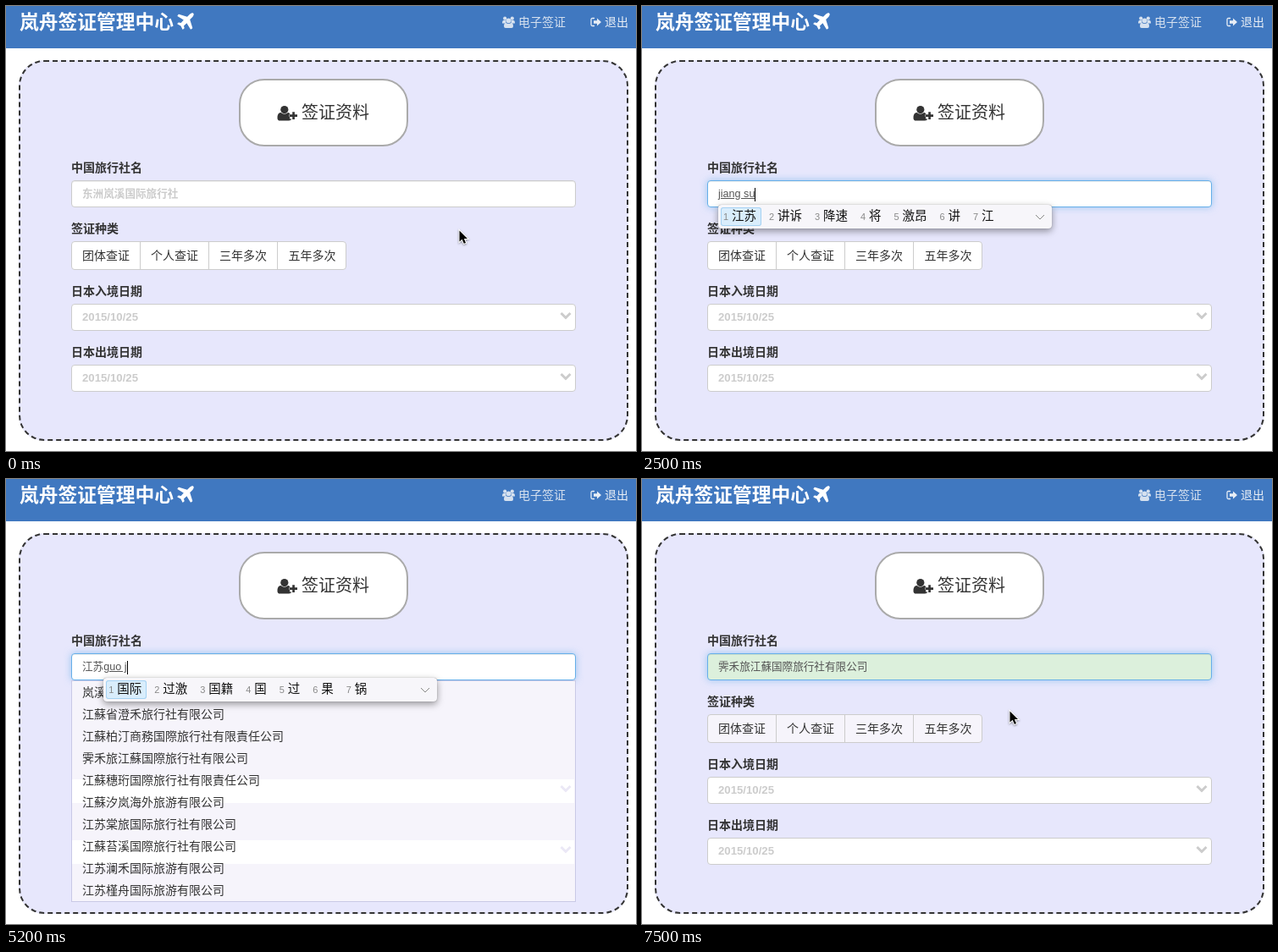
An HTML page that plays this animation: 744x526 px, repeating every 7600 ms.

```html
<!DOCTYPE html>
<html lang="zh-CN">
<head>
<meta charset="utf-8">
<title>签证资料</title>
<style>
html, body { margin: 0; width: 100%; height: 100%; overflow: hidden; background: #fff; }
#stage { position: relative; width: 744px; height: 526px; overflow: hidden; color: #333;
  font: 14px/20px "Liberation Sans", "Noto Sans CJK SC", "Noto Sans CJK", sans-serif; white-space: nowrap; }
#stage * { box-sizing: border-box; }
.abs, svg { position: absolute; }
header { position: absolute; left: 0; top: 0; width: 744px; height: 50px; background: #4078c0; }
.panel { left: 15px; top: 64px; width: 720px; height: 450px; border: 2px dashed #333;
  border-radius: 30px; background: #e7e7fc; }
.big { left: 275px; top: 86px; width: 200px; height: 80px; border: 2px solid #aaa;
  border-radius: 30px; background: #fff; }
.label { left: 77px; font-weight: bold; }
.field { left: 77px; width: 596px; height: 32px; padding-left: 12px; border: 1px solid #ccc;
  border-radius: 4px; background: #fff; font-size: 12.6px; line-height: 30px; color: #555; white-space: pre; }
.hint { color: #ccc; font-weight: bold; }
.date { font-size: 13.2px; }
.kinds { left: 77px; top: 278px; width: 325px; height: 34px; display: flex;
  border: 1px solid #ccc; border-radius: 4px; overflow: hidden; line-height: 32px; }
.kinds span { flex: none; width: 81px; text-align: center; border-right: 1px solid #ccc; }
.kinds span:last-child { border: 0; }
.caret { display: inline-block; width: 1px; height: 16px; margin-right: -1px;
  vertical-align: middle; background: #000; }
.list { left: 77px; top: 238px; width: 596px; border: 1px solid #c9c9e6; background: #f6f4fb; }
.row { position: relative; height: 26px; padding-left: 12px; line-height: 26px; }
.row.on { background: #a3d8ff; }
.band { left: 0; width: 593px; height: 28px; background: #fff; }
.ime { top: 235px; width: 394px; height: 28px; padding: 3px; border-radius: 4px; background: #f7f6fa;
  box-shadow: 0 0 1px #777, 0 3px 8px rgba(0,0,0,.4); font-size: 14.5px; line-height: 21px; color: #111; }
.ime span { display: inline-block; height: 22px; margin-right: 6px; padding: 0 6px 0 3px; border-radius: 3px; }
.ime span:first-child { background: #d9edfc; box-shadow: inset 0 0 0 1px #a5d2f3; }
.ime i { display: inline-block; width: 10px; font: 11px/21px "Liberation Sans", sans-serif; color: #888; }
#arrow, #beam { left: 0; top: 0; overflow: visible; }
</style>
</head>
<body>
<div id="stage">
  <header>
    <b class="abs" style="left:16px;top:4px;font-size:22.75px;line-height:30px;color:#fff">岚舟签证管理中心</b>
    <svg style="left:202px;top:8px" width="20" height="20" fill="#fff"><path d="M19.3.7C20.2 1.6 19.6 3.6 18.2 5L15.2 8L18.2 17.8Q18.3 18.2 18 18.5L16.6 19.5Q16 19.8 15.7 19.2L11.4 12.2L8 15.4L8.6 17.8Q8.7 18.2 8.4 18.4L7.2 19.6Q6.8 19.9 6.4 19.4L4.4 15.6L.6 13.6Q.1 13.2.4 12.8L1.6 11.6Q1.8 11.3 2.2 11.4L4.6 12L7.8 8.6L.8 4.3Q.2 4 .5 3.4L1.5 2Q1.8 1.7 2.2 1.8L12 4.8L15 1.8C16.4.4 18.4-.2 19.3.7Z"/></svg>
    <svg style="left:586px;top:12px" width="16" height="15" fill="#d6e1ef">
      <circle cx="3.2" cy="2.7" r="2.1"/><circle cx="11.8" cy="2.7" r="2.1"/>
      <path d="M0 8.5Q0 4.6 1.8 5h3Q3.6 6.8 4.7 8.5zM15 8.5Q15 4.6 13.2 5h-3Q11.4 6.8 10.3 8.5z"/>
      <circle cx="7.5" cy="5.3" r="2.9"/>
      <path d="M2 12Q2 7.8 4.5 8Q7.5 10 10.5 8Q13 7.8 13 12Q13 14 11 14H4Q2 14 2 12z"/>
    </svg>
    <span class="abs" style="left:605px;top:9px;color:#d6e1ef">电子签证</span>
    <svg style="left:690px;top:13px" width="14" height="13" fill="#e8eef6">
      <path d="M5 1.5H2.5Q1 1.5 1 3v6q0 1.5 1.5 1.5H5" fill="none" stroke="#e8eef6" stroke-width="1.3"/>
      <path d="M4 4.3h4V1.5L13 6 8 10.5V7.7H4z"/>
    </svg>
    <span class="abs" style="left:707px;top:9px;color:#e8eef6">退出</span>
  </header>
  <div class="abs panel"></div>
  <div class="abs big"></div>
  <svg style="left:320px;top:117px" width="25" height="20" fill="#333">
    <circle cx="8.8" cy="5.6" r="4.6"/>
    <path d="M.5 15.5Q.5 8.6 4.6 9Q8.8 12.6 13 9Q14.4 9 15.2 10.3V16.5H17.4Q16.6 18.6 14 18.6H3.7Q.5 18.6.5 15.5z"/>
    <path d="M18.2 8.2h2.7v3H24v2.7h-3.1V17h-2.7v-3.1H15v-2.7h3.2z" stroke="#fff" stroke-width="1" paint-order="stroke"/>
  </svg>
  <span class="abs" style="left:349px;top:111px;font-size:20px;line-height:30px">签证资料</span>
  <span class="abs label" style="top:181px">中国旅行社名</span>
  <div class="abs field" id="agency" style="top:206px"></div>
  <span class="abs label" style="top:253px">签证种类</span>
  <div class="abs kinds" id="kinds"><span>团体查证</span><span>个人查证</span><span>三年多次</span><span>五年多次</span></div>
  <span class="abs label" style="top:327px">日本入境日期</span>
  <div class="abs field hint date" style="top:352px">2015/10/25</div>
  <span class="abs label" style="top:399px">日本出境日期</span>
  <div class="abs field hint date" style="top:424px">2015/10/25</div>
  <svg width="744" height="526" style="left:0;top:0" fill="none" stroke="#ccc" stroke-width="3"><path d="M655.5 363l5.5 5.5 5.5-5.5m-11 72l5.5 5.5 5.5-5.5"/></svg>
  <div id="popups"></div>
  <svg id="arrow" width="12" height="18"><path d="M.5.5V13.6L3.6 10.8 5.8 15.8 8 14.9 5.9 10H10z" stroke="#fff" stroke-width="2" paint-order="stroke" style="filter:drop-shadow(0 1px 1px #0006)"/></svg>
  <svg id="beam" width="8" height="18" fill="none" stroke="#000"><path d="M-3-7.5Q0-7.5.5-6Q1-7.5 4-7.5M.5-6V7M-1.5 2.5h4M-3 8.5Q0 8.5.5 7Q1 8.5 4 8.5"/></svg>
</div>
<script>
const LOOP = 7600, FOCUS = 1100, PICK = 6600;
const agencies = [
  '岚溪云旅（江蘇）国際旅行社有限公司', '江蘇省澄禾旅行社有限公司',
  '江蘇柏汀商務国際旅行社有限責任公司', '霁禾旅江蘇国際旅行社有限公司',
  '江蘇穗珩国際旅行社有限責任公司', '江蘇汐岚海外旅游有限公司',
  '江苏棠旅国际旅行社有限公司', '江蘇苔溪国際旅行社有限公司',
  '江苏澜禾国际旅游有限公司', '江苏槿舟国际旅游有限公司'];
const chosen = agencies[3];
// Each word is typed as pinyin, then committed from the candidate bar.
const words = [
  { keys: 'jiang su', start: 1500, step: 120, commit: 2700, text: '江苏',
    partial: '将 讲 江 降 奖 姜 酱', full: '江苏 讲诉 降速 将 激昂 讲 江' },
  { keys: 'guo ji', start: 4500, step: 150, commit: 5600, text: '国际',
    partial: '国 过 果 锅 郭 裹 帼', full: '国际 过激 国籍 国 过 果 锅' }];
const mouse = [[0, 535, 265], [300, 535, 265], [1000, 386, 222], [2800, 386, 222], [3300, 371, 322],
  [3600, 372, 400], [4200, 366, 198], [5900, 366, 198], [6300, 372, 250], [6700, 372, 250],
  [7300, 434, 274], [LOOP, 434, 274]];
const $ = id => document.getElementById(id);
const between = (t, a, b) => t >= a && t < b;

function mouseAt(t) {
  const i = mouse.findIndex(k => k[0] > t), [a, x, y] = mouse[i - 1], [b, x2, y2] = mouse[i];
  const u = (t - a) / (b - a), e = u * u * (3 - 2 * u);
  return [x + (x2 - x) * e, y + (y2 - y) * e];
}

function imeBar(word, typed, left) {
  const items = (typed.length > word.keys.length - 2 ? word.full : word.partial).split(' ');
  return `<div class="abs ime" style="left:${left}px">` +
    items.map((s, i) => `<span><i>${i + 1}</i>${s}</span>`).join('') +
    '<svg width="12" height="8" style="right:8px;top:11px" fill="none" stroke="#888"><path d="M1 1l5 5 5-5"/></svg></div>';
}

function listBox(rows, hover) {
  const chevron = '<svg width="14" height="12" style="left:576px;top:6px" fill="none" stroke="#ebe8f6" stroke-width="3"><path d="M1.5 2L7 7.5 12.5 2"/></svg>';
  const bands = rows.length > 1
    ? [116, 188].map(y => `<div class="abs band" style="top:${y}px">${chevron}</div>`).join('') : '';
  return '<div class="abs list">' + bands + rows.map((s, i) =>
    `<div class="row${i === hover ? ' on' : ''}">${s}</div>`).join('') + '</div>';
}

function setHtml(el, html) {
  if (el.last !== html) el.innerHTML = el.last = html;
}

function render(t) {
  const [x, y] = mouseAt(t);
  const done = t >= PICK;
  const word = words.find(w => between(t, w.start, w.commit));
  const typed = word ? word.keys.slice(0, 1 + Math.floor((t - word.start) / word.step)) : '';
  const text = done ? chosen : words.filter(w => t >= w.commit).map(w => w.text).join('');

  const lastEdit = [FOCUS, 2700, 5600, PICK].filter(k => k <= t).pop();
  const caretOn = t >= FOCUS && (word || Math.floor((t - lastEdit) / 500) % 2 === 0);
  const caret = caretOn ? '<span class="caret"></span>' : '';
  setHtml($('agency'), text || typed ? `${text}<u>${typed}</u>${caret}`
    : `${caret}<span class="hint">东洲岚溪国际旅行社</span>`);

  const focus = Math.max(0, Math.min(1, (t - FOCUS) / 200));
  const style = $('agency').style;
  style.borderColor = `rgb(${204 - 102 * focus},${204 - 29 * focus},${204 + 29 * focus})`;
  style.boxShadow = `inset 0 1px 1px rgba(0,0,0,.075), 0 0 8px rgba(102,175,233,${.6 * focus * focus})`;
  style.background = done ? '#dcf0dc' : '#fff';
  $('kinds').style.background = t < 2800 ? '#fff' : '#f6f4fb';

  const hidden = between(t, 1500, 2800) || between(t, 4400, 5900);
  const hover = hidden ? -1 : Math.floor((y - 239) / 26);
  let popups = '';
  if (between(t, 2800, PICK)) popups += listBox(t < 5600 ? agencies : [chosen], hover);
  if (word) popups += imeBar(word, typed, 90 + text.length * 12.6);
  setHtml($('popups'), popups);

  const inField = between(y, 206, 238) && between(x, 77, 673);
  for (const [id, shown] of [['arrow', !inField], ['beam', inField]]) {
    $(id).style.transform = `translate(${Math.round(x)}px,${Math.round(y)}px)`;
    $(id).style.display = shown && !hidden ? '' : 'none';
  }
}

const begin = performance.now();
function tick() {
  const t = (performance.now() - begin) % LOOP;
  render(Math.floor(t / 100) * 100);
  requestAnimationFrame(tick);
}
tick();
</script>
</body>
</html>
```
